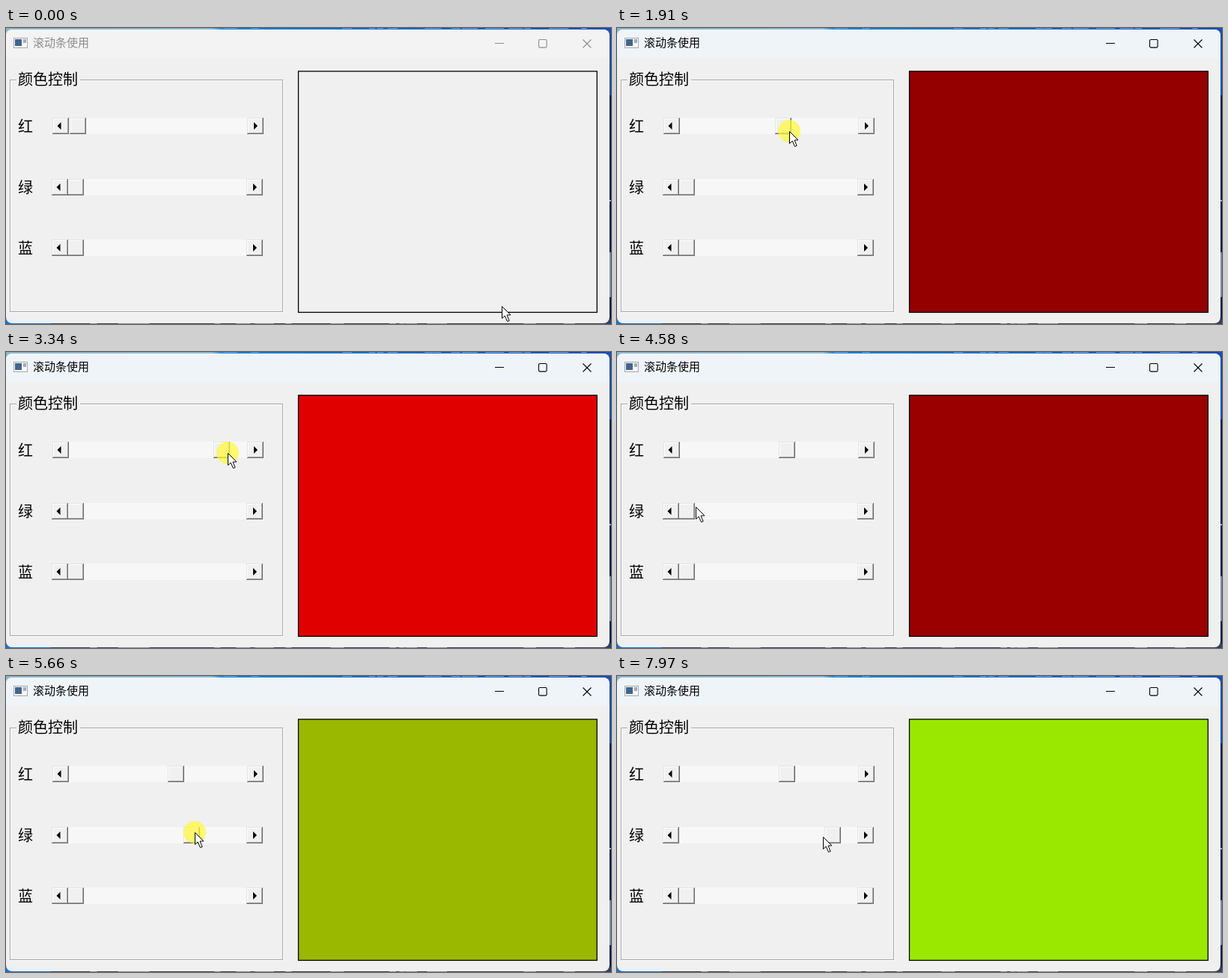
An HTML page with a canvas for the animation above (8 s loop, 808 by 396 pixels).

```html
<!DOCTYPE html>
<html lang="zh-CN">
<head>
<meta charset="utf-8">
<style>
html, body { margin: 0; width: 100%; height: 100%; overflow: hidden; }
canvas { display: block; }
</style>
</head>
<body>
<canvas id="stage" width="808" height="396"></canvas>
<script>
const c = document.getElementById('stage').getContext('2d');
const LOOP = 8000, FACE = '#f0f0f0';
const START = { x: 662, y: 372 };

// Pointer moves: start ms, end ms, destination
const moves = [
  [70, 870, 104, 129], [930, 1210, 147, 128], [1210, 1700, 194, 133],
  [1760, 2120, 280, 144], [2320, 2420, 303, 147], [2730, 2940, 309, 136],
  [3270, 3690, 235, 129], [4020, 4580, 105, 207], [4850, 5180, 192, 208],
  [5180, 5590, 252, 209], [5660, 5950, 312, 209], [6280, 6690, 301, 212],
  [6690, 7030, 247, 212], [7570, 7970, 275, 215]
];

const clamp = (v, lo, hi) => Math.min(hi, Math.max(lo, v));
const ramp = (t, a, b) => clamp((t - a) / (b - a), 0, 1);
const within = (t, a, b) => t >= a && t < b;

function pointerAt(t) {
  let { x, y } = START;
  for (const [a, b, toX, toY] of moves) {
    const p = ramp(t, a, b);
    x += (toX - x) * p;
    y += (toY - y) * p;
  }
  return { x: Math.round(x), y: Math.round(y) };
}

// The red thumb is dragged by the pointer
const redThumb = t => clamp(pointerAt(clamp(t, 930, 3690)).x - 19, 83, 284);

const greenThumb = t => Math.round(82 + 128 * ramp(t, 4850, 5180)
  + 27 * ramp(t, 5180, 5590) + 59 * ramp(t, 5660, 5950) - 19 * ramp(t, 7570, 7710));

const isPressed = t =>
  within(t, 930, 3690) || within(t, 4850, 6280) || within(t, 7570, 7960);

function random(seed) {
  return () => (seed = seed * 16807 % 2147483647) / 2147483647;
}

function box(x, y, w, h, color) {
  c.fillStyle = color;
  c.fillRect(x, y, w, h);
}

function text(str, x, y, size, color, weight = 400) {
  c.font = `${weight} ${size}px "Noto Sans CJK SC", "Noto Sans CJK", sans-serif`;
  c.fillStyle = color;
  c.fillText(str, x, y);
}

function poly(points, fill, stroke) {
  c.beginPath();
  points.forEach(p => c.lineTo(...p));
  c.closePath();
  c.fillStyle = fill;
  c.fill();
  if (stroke) {
    c.strokeStyle = stroke;
    c.lineWidth = 1;
    c.stroke();
  }
}

function line(...points) {
  c.beginPath();
  points.forEach(p => c.lineTo(...p));
  c.stroke();
}

function desktop() {
  const g = c.createLinearGradient(0, 0, 808, 0);
  g.addColorStop(0, '#8fb4c8');
  g.addColorStop(.34, '#8fbad0');
  g.addColorStop(.36, '#0f84dc');
  g.addColorStop(1, '#1a4fb4');
  box(0, 0, 808, 396, g);
  box(804, 90, 4, 306, '#141d50');
  box(0, 385, 60, 11, '#1873d2');
  box(60, 390, 748, 6, '#35415c');
  const rnd = random(7);
  for (let i = 0; i < 24; i++) {
    box(290 + rnd() * 480, 0, 4 + rnd() * 16, 1, '#6fa9e6');
    box(70 + rnd() * 720, 394, 4 + rnd() * 20, 2, '#8792a6');
  }
  box(806, 230, 2, 2, '#9aa6c8');
  box(806, 300, 2, 60, '#7d8aa8');
}

function titleBar(active) {
  const ink = active ? '#000' : '#8c8c8c';
  box(0, 2, 806, 38, active ? '#eff4f9' : '#f3f3f3');
  box(10, 13, 19, 14, '#a6a8ab');
  box(11, 14, 17, 12, '#f8f8f8');
  box(12, 15, 9, 9, '#42658f');
  box(23, 15, 4, 5, '#a3adb8');
  text('滚动条使用', 36, 25, 15, ink);
  c.strokeStyle = ink;
  c.lineWidth = 1.1;
  line([653, 20.5], [665, 20.5]);
  c.beginPath();
  c.roundRect(711.5, 15.5, 10.6, 10.6, 1.5);
  c.stroke();
  line([770.5, 15.5], [781.5, 26.5]);
  line([781.5, 15.5], [770.5, 26.5]);
}

function groupBox() {
  c.lineWidth = 1;
  for (const [d, color] of [[1, '#fff'], [0, '#a6a6a6']]) {
    c.strokeStyle = color;
    c.strokeRect(5.5 + d, 69.5 + d, 364, 310);
  }
  box(14, 66, 85, 8, FACE);
  text('颜色控制', 16, 76, 20, '#000', 300);
}

function button(x, y) {
  box(x, y, 22, 22, '#6e6e6e');
  box(x, y, 21, 21, '#e3e3e3');
  box(x + 1, y + 1, 20, 20, '#a2a2a2');
  box(x + 1, y + 1, 19, 19, '#fff');
  box(x + 2, y + 2, 18, 18, FACE);
}

function arrow(x, y, dir) {
  poly([[x, y], [x + 5 * dir, y - 5], [x + 5 * dir, y + 5]], '#000');
}

function scrollBar(label, x, y, thumb) {
  text(label, 16, y + 18.5, 20, '#000', 300);
  box(x, y, 282, 22, '#f7f7f7');
  button(thumb, y);
  button(x, y);
  button(x + 260, y);
  arrow(x + 6.5, y + 11, 1);
  arrow(x + 274, y + 11, -1);
}

function swatch(color) {
  box(390, 58, 399, 322, color);
  c.strokeStyle = '#000';
  c.lineWidth = 1.3;
  c.strokeRect(390.5, 57.9, 398.8, 322.5);
}

function pointer({ x, y }, pressed) {
  if (pressed) {
    c.fillStyle = 'rgba(255, 248, 50, .7)';
    c.beginPath();
    c.arc(x, y, 15, 0, 7);
    c.fill();
  }
  c.save();
  c.translate(x + .5, y + .5);
  poly([[0, 0], [0, 16], [3.7, 12.6], [7, 20], [9.6, 19], [6.5, 11.6], [11.4, 11.4]],
    '#fff', '#000');
  c.restore();
}

function draw(t) {
  const red = redThumb(t), green = greenThumb(t);
  desktop();
  c.save();
  c.beginPath();
  c.roundRect(0, 2, 806, 393, 8);
  c.clip();
  box(0, 2, 806, 393, FACE);
  titleBar(t >= 930);
  groupBox();
  scrollBar('红', 62, 120, red);
  scrollBar('绿', 61, 202, green);
  scrollBar('蓝', 61, 283, 82);
  const r = Math.round((red - 83) * 1.155), g = Math.round((green - 82) * 1.19);
  swatch(t > 930 ? `rgb(${r}, ${g}, 0)` : FACE);
  c.restore();
  pointer(pointerAt(t), isPressed(t));
}

function frame() {
  draw(performance.now() % LOOP);
  requestAnimationFrame(frame);
}
frame();
</script>
</body>
</html>
```
